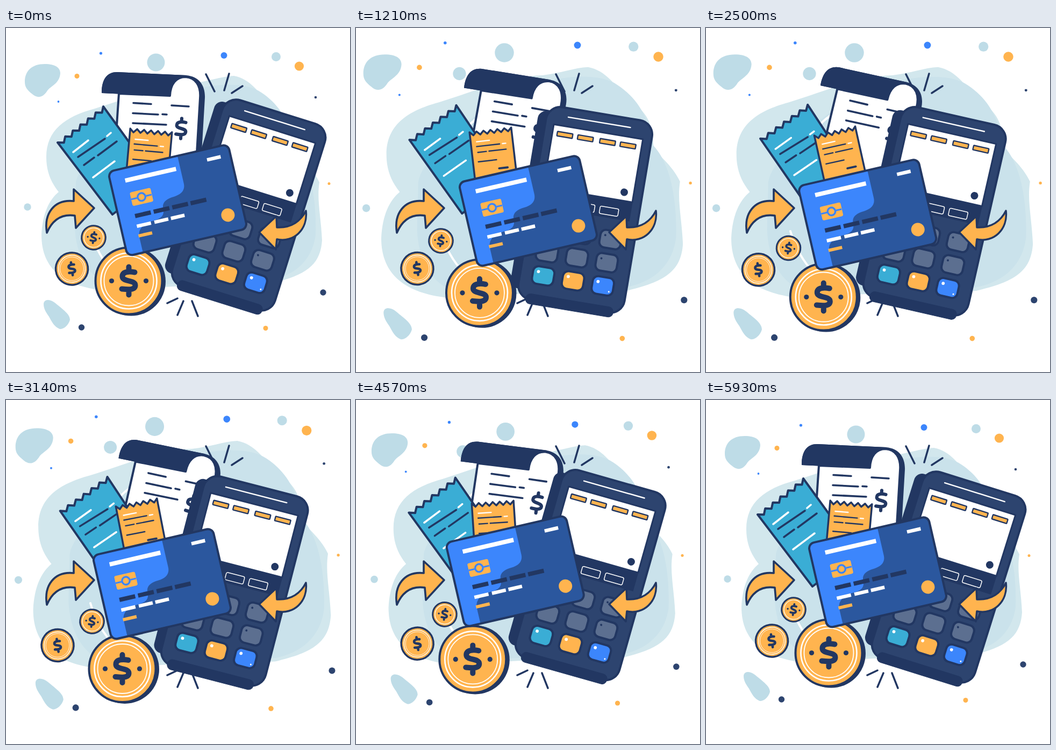
These frames come from a looping animation (640 by 640 pixels, 6000 ms). An HTML page:

```html
<!DOCTYPE html>
<html lang="en">
<head>
<meta charset="utf-8">
<title>Card payment</title>
<style>
  html, body { margin: 0; width: 100%; height: 100%; overflow: hidden; background: #fff; }
  svg { display: block; width: 100vw; height: 100vh; }
  .ink { stroke: #223762; stroke-linecap: round; stroke-linejoin: round; }
  .line { fill: none; }
  .white { stroke: #fff; stroke-linecap: round; }
</style>
</head>
<body>
<svg viewBox="0 0 640 640">
  <defs>
    <path id="dollar" class="ink line" d="M11-16C2-18-12-18-12-8C-12 2 12-2 12 8C12 18-4 16-13 15M0-26V-18M0 17V26"/>
    <clipPath id="cardClip"><rect x="-114.5" y="-80.5" width="229" height="161" rx="11"/></clipPath>
  </defs>

  <g id="back">
    <path fill="#d2e7ed" d="M75 240C75 190 110 165 165 150C230 130 290 104 345 103C375 100 400 90 424 89C455 95 470 120 490 142C525 165 537 185 537 230C550 245 570 260 583 287C578 320 586 350 588 395C585 440 560 460 490 476L330 480L180 488C110 480 66 450 66 385C68 345 80 320 98 305C82 285 75 265 75 240Z"/>
    <path fill="#cae2eb" d="M130 290C130 260 200 180 300 130C360 105 440 95 475 120C520 150 530 190 537 225C570 260 578 330 576 385C570 430 540 460 490 470L200 480C150 465 130 420 128 370Z"/>
    <g id="dots" fill="#bedce7">
      <path d="M35 100C35 80 48 67 72 67C92 67 101 74 101 84C100 104 82 108 76 118C68 130 58 131 49 123C39 115 35 110 35 100Z"/>
      <path d="M70 513C71 504 82 504 92 512C106 524 119 532 119 543C116 554 106 561 100 560C90 556 86 548 80 537C72 526 70 520 70 513Z"/>
    </g>
  </g>

  <path class="line white" stroke-width="4" stroke-linecap="butt" d="M157 378A191 191 0 0 0 202 457M211 180A191 191 0 0 1 234 161"/>
  <path class="ink line" stroke-width="3.5" d="M372 86L388 118M415 85L406 116M440 108L420 121M300 512L319 503M319 534L330 508M357 536L346 508"/>

  <g id="receipt">
    <path fill="#223762" d="M178 121C178 95 188 82 207 82L335 88C360 90 371 108 370 130L360 300H320L305 127Z"/>
    <path class="ink" fill="#fff" stroke-width="4" d="M210 122L305 126C306 105 316 91 334 91C353 92 363 108 361 131L351 300H198Z"/>
    <path fill="#223762" d="M178 121C178 95 188 82 207 82L337 88C318 90 306 102 305 127Z"/>
    <path class="ink line" stroke-width="3.6" d="M237 139.500L270 141.500M308 144L340 146M236 158.500L283 161M291 160.500L299 161M236 177L298 180"/>
    <use href="#dollar" stroke-width="8.500" transform="translate(326 187) rotate(3) scale(.72)"/>
  </g>

  <g id="teal">
    <path id="tealPaper" class="ink" fill="#3aadd5" stroke-width="4"/>
    <path class="ink line" stroke-width="3.500" d="M134 240L184 206M145 255L164 241M171 237L206 211"/>
    <path class="line white" stroke-width="3.500" d="M125 231L153 209M188 201L195 195M162 278L202 248"/>
  </g>

  <g id="slip">
    <g transform="translate(270 190.500) rotate(5.100)">
      <path id="slipPaper" class="ink" fill="#ffb44f" stroke-width="3.500"/>
      <path class="ink line" stroke-width="2.400" d="M-29 28H14M-28 39H-12M-7 39H25M-29 56.500H5"/>
      <path class="ink line" stroke-width="3.800" d="M8 73H24"/>
      <path class="line white" stroke-width="2.400" d="M-28 19H-4M19.500 28H25.500"/>
    </g>
  </g>

  <g id="terminal">
    <g id="device" transform="translate(462 348) rotate(17.400)">
      <rect x="-131" y="-184" width="80" height="334" rx="15" fill="#223762"/>
      <rect class="ink" x="-115.500" y="-196" width="200" height="363" rx="27" fill="#2d446f" stroke-width="4"/>
      <rect class="ink" x="-98" y="156" width="165" height="19" rx="9" fill="#223762"/>
      <path class="line white" stroke-width="2.400" d="M-75-179.700H42"/>
      <rect x="-101" y="-44" width="170" height="37" fill="#223762"/>
      <rect class="ink" x="-99.500" y="-162" width="168" height="119" fill="#fff" stroke-width="3"/>
      <circle cx="50.500" cy="-59" r="7" fill="#223762"/>
    </g>
  </g>

  <g id="coinB"></g>
  <g id="coinC"></g>
  <g id="coinA"></g>

  <g id="card">
    <g transform="translate(319.500 320.300) rotate(-13)">
      <g clip-path="url(#cardClip)">
        <path fill="#2b579e" d="M-115-81H115V81H-115Z"/>
        <path fill="#3c86fc" d="M-115-81H18V-28C18-14 8-9-5-8C-22-7-30-2-30 10C-30 22-38 27-52 27C-76 28-84 38-85 50V81H-115Z"/>
      </g>
      <rect class="ink line" x="-114.500" y="-80.500" width="229" height="161" rx="11" stroke-width="4"/>
      <path fill="#fff" d="M-87-61.500H10V-53.500H-87ZM70-64H96V-57.500H70ZM-85 27H-58V33.500H-85ZM-51.500 27H-25V33.500H-51.500ZM-20 27H6V33.500H-20Z"/>
      <path fill="#223762" d="M-84 7H-54V15H-84ZM-48.500 7H-18.500V15H-48.500ZM-13 7H17V15H-13ZM22 7H52V15H22Z"/>
      <rect x="-84" y="-34" width="39.500" height="26" rx="3" fill="#ffb44f"/>
      <path stroke="#3c86fc" stroke-width="3" d="M-84-21H-45"/>
      <circle cx="-64.300" cy="-21" r="7.200" fill="#ffb44f" stroke="#3c86fc" stroke-width="3.500"/>
      <path fill="#ffb44f" d="M-86 45.500H-60V51.500H-86Z"/>
      <circle cx="84.800" cy="48" r="12.500" fill="#ffb44f"/>
    </g>
  </g>

  <path class="ink" fill="#ffb44f" stroke-width="3.600" d="M76 381C70 345 90 318 126 322V300L164 335L130 372L128 349C100 345 85 360 76 381Z"/>
  <path class="ink" fill="#ffb44f" stroke-width="3.600" d="M558 340C549 358 532 372 504 371L503 350L471 380L502 412L504 393C535 400 562 375 558 340Z"/>
</svg>
<script>
const $ = id => document.getElementById(id);
const add = (id, markup) => $(id).insertAdjacentHTML('beforeend', markup);
const navy = '#223762', orange = '#ffb44f', blue = '#3c86fc', pale = '#bedce7';
const disc = (x, y, r, fill) => `<circle cx="${x}" cy="${y}" r="${r}" fill="${fill}"/>`;
const ring = (r, w) => `<circle r="${r}" fill="none" stroke="#fff" stroke-width="${w}"/>`;

// Sawtooth edge from one corner to the other; teeth bite to the right of travel.
function teeth(x0, y0, x1, y1, n, depth) {
  const dx = x1 - x0, dy = y1 - y0, len = Math.hypot(dx, dy), pts = [];
  for (let i = 0; i <= 2 * n; i++) {
    const k = i / (2 * n), bite = i % 2 * depth / len;
    pts.push(`${x0 + dx * k - dy * bite} ${y0 + dy * k + dx * bite}`);
  }
  return 'M' + pts.join('L');
}

function coin(id, x, y, r, tilt, size, line, rings, eyes) {
  const shade = r > 50 ? disc(4.5, 1, r + 2, navy) : '';
  add(id, `<g transform="translate(${x} ${y}) rotate(${tilt})">${shade}
    <circle class="ink" r="${r}" fill="${orange}" stroke-width="${line}"/>
    ${rings.map(([a, w]) => ring(a, w)).join('')}
    <use href="#dollar" stroke-width="10" transform="scale(${size})"/>
    ${eyes ? disc(-eyes[0], 0, eyes[1], navy) + disc(eyes[0], 0, eyes[1], navy) : ''}</g>`);
}

$('tealPaper').setAttribute('d', teeth(96, 213, 181, 146, 6, 7.5) + 'L281 284L198 347Z');
$('slipPaper').setAttribute('d', teeth(-39, 0, 39, 0, 6, 6.5) + 'V110H-39Z');

add('dots', [
  [279, 64, 16.5, pale], [502.5, 53.5, 8.5, pale], [40, 333, 6.7, pale], [201.3, 100.3, 11.3, pale],
  [405.5, 51, 6, blue], [176.5, 47, 2.6, blue], [97.5, 137, 1.9, blue],
  [545.5, 71, 8.6, orange], [132, 89.5, 4.5, orange], [601, 289.5, 2.5, orange], [483, 558.5, 4.5, orange],
  [576, 129, 2.3, '#2d446f'], [590, 492, 5.7, '#2d446f'], [140.5, 557, 5.7, '#2d446f']
].map(d => disc(...d)).join(''));

coin('coinA', 228.5, 470.5, 62, 0, 1, 4, [[52, 2.6], [46, 1.8]], [32, 4.6]);
coin('coinB', 122.5, 448, 30, -8, .46, 3.5, [[25, 1.3], [22, .8]]);
coin('coinC', 163, 390, 22.3, 8, .39, 3, [[18, 1.2]], [11, 1.7]);

for (const x of [-76, -37.3, 4.5, 43])
  add('device', `<rect class="ink" x="${x - 14.5}" y="-150.2" width="29" height="8.400" rx="1" fill="${orange}" stroke-width="2.400"/>`);
for (const x of [-61.2, -16.4, 28.4])
  add('device', `<rect x="${x - 17.5}" y="-26.500" width="35" height="14" rx="2.500" fill="none" stroke="#fff" stroke-width="1.500"/>`);

const gray = '#5c6f90';
[[gray, gray, gray], [gray, gray, gray], ['#3aadd5', orange, blue]].forEach((row, j) =>
  row.forEach((fill, i) => {
    const x = -72.5 + i * 56.2, y = 32 + j * 43.7;
    add('device', `<rect class="ink" x="${x - 20}" y="${y - 16.5}" width="40" height="33" rx="10" fill="${fill}" stroke-width="4"/>`);
    if (j === 2) add('device', disc(x - 10, y - 6.5, 2.9, '#fff'));
    else if (i === 2) add('device', disc(x - 11, y - 6.5, 2, navy));
    if (j === 2 && i === 2) add('device', disc(x + 12.8, y + 9, 1.5, '#fff'));
  }));

// Offsets [x, y, angle] from the rest pose at each key time.
const LOOP = 6000, STEPS = 84;
const keys = [0, 1210, 2500, 3140, 3930, 5210, 5930];
const swell = [[.075], [.075], [.061], [.039], [.0065]];
const layers = [
  { id: 'receipt', pivot: [266.5, 178.8], pose: [[16, 0, 6.4], [24, 0, 9.7], [21.5, .5, 8.9], [17.5, 0, 7], [6, 0, 2]] },
  { id: 'teal', pivot: [258, 322], pose: [[0, 0, 1.75], [0, 0, 2.6], [0, 0, 2.4], [0, 0, 1.8], [0, 0, .6]] },
  { id: 'slip', pivot: [270, 190.5], pose: [[-20, -1, -11.7], [-30.5, 1, -17.6], [-27.5, 0, -16.1], [-22, -.5, -12.4], [-9, -.5, -5.1]] },
  { id: 'terminal', pivot: [462, 348], pose: [[-22.5, 7.4, -7.9], [-24.9, 10.4, -4.6], [-25.4, 6.6, -2.9], [-22.5, -2.7, -2.6], [-6.4, -3.5, -.5]] },
  { id: 'card', pivot: [0, 0], pose: [[1, 20, 0], [-18.7, 27, 0], [-29, 22, 0], [-32, 5.7, 0], [-12, -5.8, 0]] },
  { id: 'coinA', pivot: [0, 0], pose: [[1.5, 22.3, 0], [-9.7, 30, 0], [-12, 29.5, 0], [-17, 21, 0], [-4, 3.5, 0]] },
  { id: 'coinB', pivot: [0, 0], pose: [[-8.5, -.5, 0], [-25, 1.7, 0], [-26.5, 8.5, 0], [-15.5, 8, 0], [-2.5, 2, 0]] },
  { id: 'coinC', pivot: [0, 0], pose: [[-5, 6, 0], [-9.5, 19.5, 0], [-3, 22, 0], [2, 15.5, 0], [1, 2.7, 0]] }
];

// Smooth curve through the keys, at rest at both ends of the loop.
function sample(pose, col, t) {
  const val = i => i < 1 || i > pose.length ? 0 : pose[i - 1][col];
  const slope = i => i < 1 || i > pose.length ? 0 : (val(i + 1) - val(i - 1)) / (keys[i + 1] - keys[i - 1]);
  let i = 0;
  while (i < keys.length - 2 && t > keys[i + 1]) i++;
  const h = keys[i + 1] - keys[i], u = Math.min(1, (t - keys[i]) / h), v = 1 - u;
  return v * v * (1 + 2 * u) * val(i) + u * u * (3 - 2 * u) * val(i + 1)
    + h * u * v * (v * slope(i) - u * slope(i + 1));
}

function draw(t) {
  const s = 1 + sample(swell, 0, t);
  $('back').setAttribute('transform', `translate(319 304) scale(${s}) translate(-319 -304)`);
  for (const { id, pivot, pose } of layers) {
    const [x, y, a] = [0, 1, 2].map(c => sample(pose, c, t));
    $(id).setAttribute('transform', `translate(${x} ${y}) rotate(${a} ${pivot})`);
  }
}

const start = performance.now();
function tick() {
  const t = (performance.now() - start) % LOOP, step = LOOP / STEPS;
  draw(Math.floor((t + 5) / step) % STEPS * step);
  requestAnimationFrame(tick);
}
tick();
</script>
</body>
</html>
```
